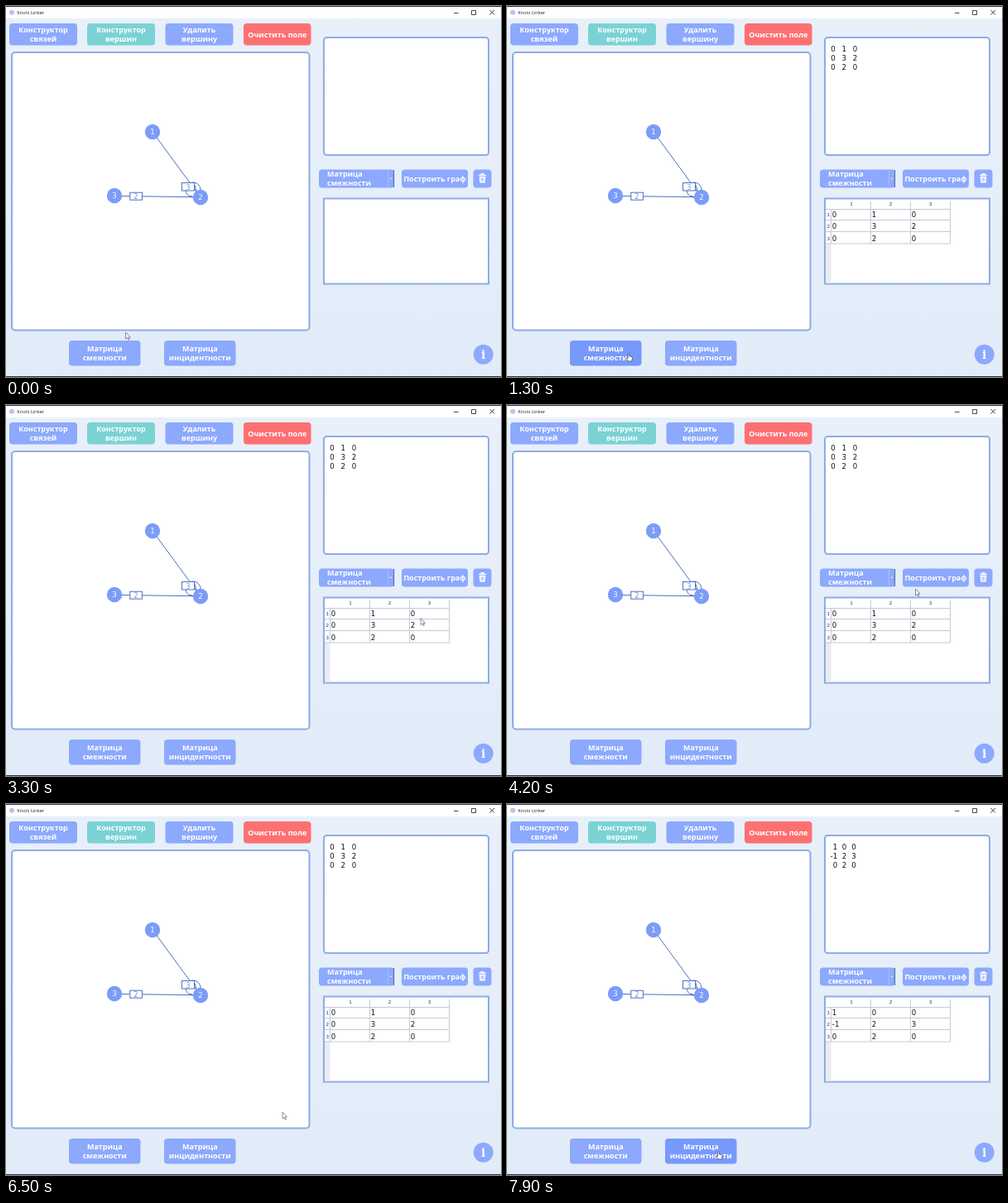
These frames come from a looping animation (598 by 448 pixels, 8000 ms). An HTML page:

```html
<!DOCTYPE html>
<html lang="ru">
<head>
<meta charset="utf-8">
<title>Knots Linker</title>
<style>
  html, body { margin: 0; width: 100%; height: 100%; overflow: hidden; }
  svg { display: block; width: 598px; height: 448px; }
  .label { font: bold 9px "Open Sans", "Noto Sans", sans-serif; fill: #fff; }
  .cell { font: 8.6px "DejaVu Sans", sans-serif; fill: #111; }
  .head { font: 5.6px "DejaVu Sans", sans-serif; fill: #333; }
  .node { font: 8.6px "DejaVu Sans", sans-serif; fill: #fff; }
  .weight { font: 8.4px "DejaVu Sans", sans-serif; fill: #7894d8; }
  .mid { text-anchor: middle; }
  .panel { fill: #fff; stroke: #8facE4; stroke-width: 2; }
  .edge { fill: none; stroke: #4e70c2; stroke-width: 1; }
  .grid { fill: none; stroke: #c3cad8; stroke-width: 1; }
</style>
</head>
<body>
<svg id="stage" viewBox="0 0 598 448" xmlns="http://www.w3.org/2000/svg">
  <defs>
    <linearGradient id="sky" x2="0" y2="1">
      <stop offset="0" stop-color="#e8f0fa"/>
      <stop offset="1" stop-color="#e2ecf8"/>
    </linearGradient>
  </defs>
  <rect width="598" height="448" fill="url(#sky)"/>

  <!-- title bar -->
  <rect width="598" height="15" fill="#fff"/>
  <rect width="598" height="1" fill="#30343c"/>
  <rect y="447" width="598" height="1" fill="#2b3340"/>
  <circle cx="7" cy="7.8" r="3" fill="#b5c6ea"/>
  <text x="13.3" y="10.2" font-family="Open Sans, sans-serif" font-size="5.7" fill="#222">Knots Linker</text>
  <path d="M541 8.5h5.5M562.5 5.5h5v5h-5zM584.5 5l5.5 5.5m0-5.5l-5.5 5.5" fill="none" stroke="#333" stroke-width=".9"/>

  <!-- panels -->
  <rect class="panel" x="7" y="56" width="359.5" height="335.5" rx="4"/>
  <rect class="panel" x="384" y="38" width="199" height="142" rx="3.5"/>
  <rect class="panel" x="384" y="232.5" width="199" height="103"/>
  <g id="buttons"></g>

  <!-- drop-down edge, bin, info -->
  <path d="M461.5 199v19" stroke="#a9bdfb" stroke-width="1"/>
  <path d="M468.5 198v21" stroke="#5a6ea8" stroke-width="1.2"/>
  <path d="M463.5 207.8h3l-1.5 1.8z" fill="#e8eeff"/>
  <path d="M571 204.3h9M574 204v-1.3h3v1.3" fill="none" stroke="#fff" stroke-width="1.2"/>
  <path d="M571.7 205.7h7.6l-.6 7.8h-6.4z" fill="#fff"/>
  <path d="M574 207.2v4.8m1.5-4.8v4.8m1.5-4.8v4.8" stroke="#8ca9fd" stroke-width=".7"/>
  <circle cx="576.7" cy="420.7" r="12" fill="#8ca9fd"/>
  <text class="mid" x="576.7" y="426" font-family="DejaVu Serif, Noto Serif, serif" font-weight="bold" font-size="14" fill="#fff">i</text>

  <!-- graph -->
  <g class="edge">
    <path d="M177 152L235 231M131 229.4L235 230.8"/>
    <circle cx="226" cy="222" r="9"/>
    <path d="M228.3 216.5L230.2 224.4M226 230.6l-4-1.6"/>
    <rect x="212.5" y="213.5" width="15" height="9.5" fill="#fff"/>
    <rect x="149.8" y="225.2" width="14.6" height="9" fill="#fff"/>
  </g>
  <text class="weight mid" x="220" y="221.5">3</text>
  <text class="weight mid" x="157" y="233">2</text>
  <g id="nodes"></g>

  <!-- results -->
  <g id="results">
    <rect x="385" y="287" width="6.5" height="47.5" fill="#ececf0"/>
    <path class="grid" d="M385 245.5H535.5M385 258.5H535.5M385 272.5H535.5M385 287H535.5M391.5 245V287M439.5 236V287M487.5 236V287M535.5 236V287"/>
    <g id="headers"></g>
    <g id="adjacency"></g>
    <g id="incidence"></g>
  </g>

  <g id="cursor">
    <path id="arrow" d="M0 0V8L1.9 6.4L3.2 9.2L4.4 8.6L3.1 5.9H5.4Z" fill="#fff" stroke="#555d6b" stroke-width=".7"/>
    <path id="hand" d="M-.9 .6Q0-.5.9.6V3.4L4 4.2Q4.9 4.6 4.5 6.4L3.8 9.4H-.6L-3 5.8Q-2.6 4.5-.9 6Z" fill="#fff" stroke="#333c55" stroke-width=".7"/>
  </g>
</svg>

<script>
const BLUE = '#8ca9fd', HOVER = '#7899fc', LOOP = 8000, STEP = 100;
const $ = id => document.getElementById(id);

function add(parent, tag, attrs, text) {
  const el = document.createElementNS('http://www.w3.org/2000/svg', tag);
  for (const key in attrs) el.setAttribute(key, attrs[key]);
  if (text !== undefined) el.textContent = text;
  return parent.appendChild(el);
}

function button(x, y, width, height, lines, fill = BLUE, left) {
  const box = add($('buttons'), 'rect', { x, y, width, height, rx: 4, fill });
  const first = y + height / 2 + (lines.length > 1 ? -2.2 : 3.4);
  lines.forEach((line, i) => add($('buttons'), 'text', {
    class: left ? 'label' : 'label mid',
    x: left || x + width / 2,
    y: first + i * 11
  }, line));
  return box;
}

button(4, 21, 82, 26.5, ['Конструктор', 'связей']);
button(98, 21, 82, 26.5, ['Конструктор', 'вершин'], '#7bd2d4');
button(192.5, 21, 82, 26.5, ['Удалить', 'вершину']);
button(287, 21, 81.5, 26.5, ['Очистить поле'], '#fd7072');
button(378, 197.5, 91, 22, ['Матрица', 'смежности'], BLUE, 388);
button(478, 197.5, 80, 22, ['Построить граф']);
button(564.5, 197.5, 22, 22, []);
const adjacencyButton = button(76, 404, 86.5, 30.5, ['Матрица', 'смежности']);
const incidenceButton = button(191, 404, 86.5, 30.5, ['Матрица', 'инцидентности']);

[[177, 152], [235, 231], [131, 229]].forEach(([x, y], i) => {
  add($('nodes'), 'circle', { cx: x, cy: y, r: 9.2, fill: '#7b9cf8' });
  add($('nodes'), 'text', { class: 'node mid', x, y: y + 3.4 }, i + 1);
});

const tableRows = [255, 269, 283.5];
[416, 463.5, 511.5].forEach((x, i) => {
  add($('headers'), 'text', { class: 'head mid', x, y: 241.2 }, i + 1);
  add($('headers'), 'text', { class: 'head mid', x: 388.3, y: tableRows[i] - .7 }, i + 1);
});

function matrix(group, rows, columns) {
  rows.forEach((row, r) => row.forEach((value, c) => {
    // a minus sign hangs to the left of its digit
    add(group, 'text', { class: 'cell', x: columns[c] + 2.7, y: 54.7 + r * 11, 'text-anchor': 'end' }, value);
    add(group, 'text', { class: 'cell', x: 392.8 + c * 48, y: tableRows[r] }, value);
  }));
}
matrix($('adjacency'), [[0, 1, 0], [0, 3, 2], [0, 2, 0]], [394, 407.3, 420.5]);
matrix($('incidence'), [[1, 0, 0], [-1, 2, 3], [0, 2, 0]], [396.5, 407.5, 419]);

// time, x, y of the pointer tip
const path = [
  [0, 144.7, 394], [700, 147, 419.5], [1500, 147, 419.5],
  [1900, 168, 416], [2400, 202, 394], [3300, 501, 257.5],
  [3700, 493.5, 222], [5500, 493.5, 222], [5600, 490.8, 222],
  [5700, 475, 222], [5800, 475, 222], [6500, 334, 372],
  [6700, 299, 404], [7000, 255.5, 419.5], [LOOP, 255.5, 419.5]
];

function pointer(t) {
  const i = path.findIndex(p => p[0] > t);
  const [t0, x0, y0] = path[i - 1], [t1, x1, y1] = path[i];
  const u = (t - t0) / (t1 - t0), k = u * u * (3 - 2 * u);
  return [x0 + (x1 - x0) * k, y0 + (y1 - y0) * k];
}

const show = (el, on) => el.setAttribute('visibility', on ? 'inherit' : 'hidden');

function draw(time) {
  const t = Math.floor(time % LOOP / STEP) * STEP;
  const [x, y] = pointer(t);
  const over = left => x >= left && x <= left + 86.5 && y >= 404 && y <= 434.5;
  const first = over(76), second = over(191);

  adjacencyButton.setAttribute('fill', first ? HOVER : BLUE);
  incidenceButton.setAttribute('fill', second ? HOVER : BLUE);
  show($('arrow'), !first && !second);
  show($('hand'), first || second);
  $('cursor').setAttribute('transform', `translate(${x} ${y})`);

  show($('results'), t >= 1100);
  show($('adjacency'), t >= 1100 && t < 7800);
  show($('incidence'), t >= 7800);
}

const start = performance.now();
function tick() {
  draw(performance.now() - start);
  requestAnimationFrame(tick);
}
tick();
</script>
</body>
</html>
```
